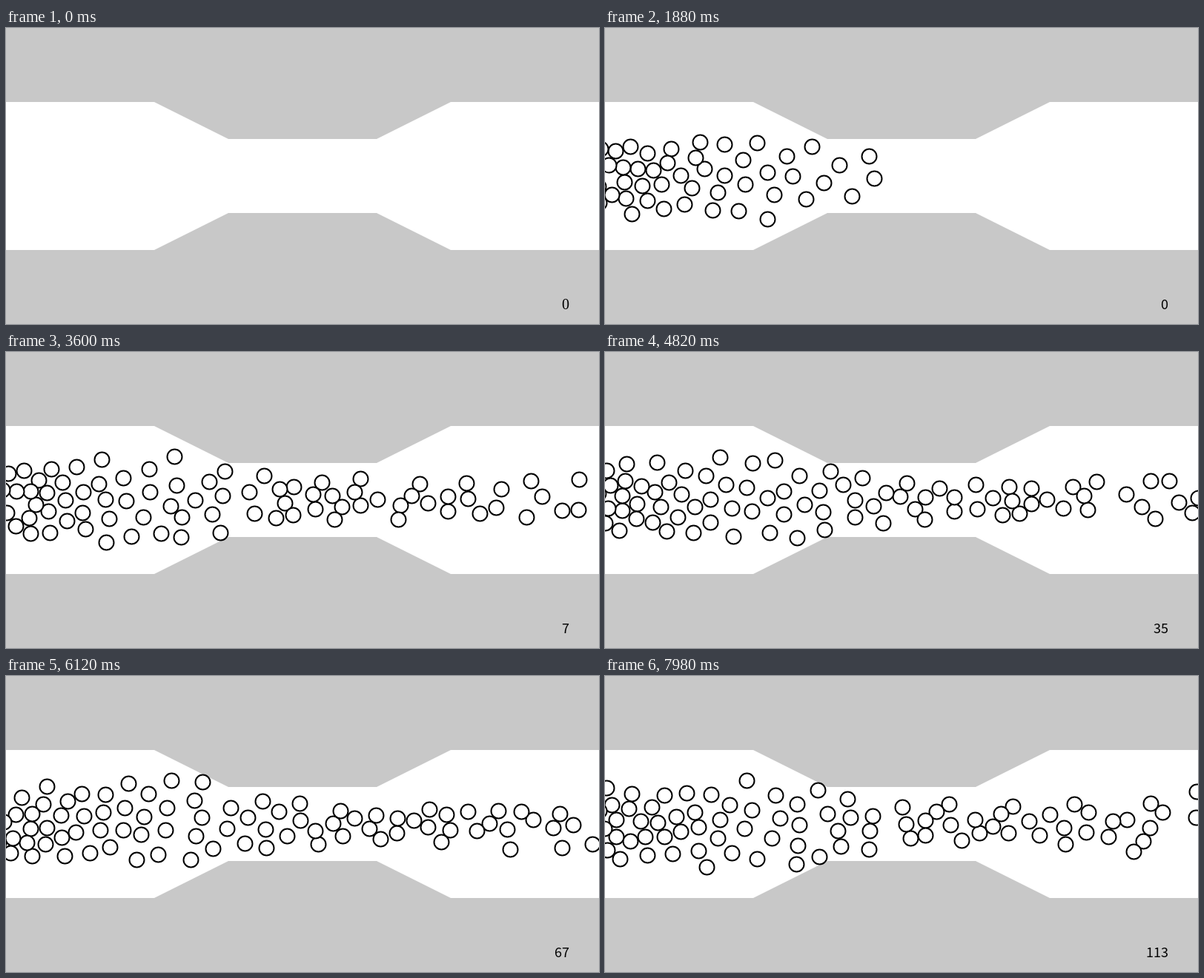
Write an HTML page with a canvas that moves like this. It is 800 px wide and 400 px high and loops after 8 s.

```html
<!DOCTYPE html>
<html lang="en">
<head>
<meta charset="utf-8">
<title>Particles through a narrow passage</title>
<style>
  html, body { margin: 0; width: 100%; height: 100%; overflow: hidden; background: #c8c8c8; }
  svg, canvas { position: absolute; left: 0; top: 0; width: 800px; height: 400px; }
  text { font: 18px "Noto Sans CJK JP", "Noto Sans CJK SC", "Noto Sans CJK", "Noto Sans", sans-serif; text-anchor: end; }
  text.initial { font: 20px "Liberation Serif", serif; }
</style>
</head>
<body>
<svg viewBox="0 0 800 400">
  <path fill="#fff" d="M0 100H200L300 150H500L600 100H800V300H600L500 250H300L200 300H0Z"/>
  <text id="counter" class="initial" x="760" y="380">0</text>
</svg>
<canvas id="stage" width="800" height="400"></canvas>
<script>
const LOOP = 8000, STEP = 20, PREROLL = 8;
const RADIUS = 10, EXIT = 811, MID = 200;
const ctx = document.getElementById('stage').getContext('2d');
const counter = document.getElementById('counter');

let particles, passed, spawned, seed, steps;

function reset() {
  particles = [];
  passed = spawned = steps = 0;
  seed = 20117;
}

function random(low, high) {
  seed = (seed * 16807) % 2147483647;
  return low + (high - low) * seed / 2147483647;
}

const clamp = (v, low, high) => Math.min(high, Math.max(low, v));

// Half the height of the passage at x.
const halfHeight = x => 50 + 50 * clamp((Math.abs(x - 400) - 100) / 100, 0, 1);

// Constant acceleration to the right, as speed over distance.
const flowSpeed = x => Math.sqrt(4.6 + 0.066 * Math.max(x, -10));

function spawn() {
  const lead = 1 + 0.06 * Math.exp(-spawned / 6);
  particles.push({
    x: -30,
    y: MID + random(-28, 28),
    ux: 0,
    vy: random(-0.25, 0.25),
    pace: lead * (spawned ? random(0.96, 1.04) : 1)
  });
  spawned++;
}

function eachPair(range, act) {
  for (let i = 0; i < particles.length; i++) {
    for (let j = i + 1; j < particles.length; j++) {
      const a = particles[i], b = particles[j];
      const dx = b.x - a.x, dy = b.y - a.y;
      if (Math.abs(dx) >= range || Math.abs(dy) >= range) continue;
      const d = Math.sqrt(dx * dx + dy * dy) || 0.01;
      if (d < range) act(a, b, dx / d, dy / d, range - d);
    }
  }
}

function repel(a, b, nx, ny, depth) {
  const f = 0.0006 * depth;
  a.ux -= f * nx; a.vy -= f * ny;
  b.ux += f * nx; b.vy += f * ny;
}

function separate(a, b, nx, ny, depth) {
  const f = 0.4 * depth;
  a.x -= f * nx; a.y -= f * ny;
  b.x += f * nx; b.y += f * ny;
}

function keepInside(p) {
  const limit = halfHeight(p.x) - RADIUS - 1;
  const offset = p.y - MID;
  if (Math.abs(offset) <= limit) return;
  const side = Math.sign(offset);
  p.y = MID + side * limit;
  p.vy = -side * random(0.4, 1.6);
}

// The narrowing bends paths inwards, the widening lets them fan out.
function bend(x) {
  if (x > 500) return 0.0006;
  return x > 180 && x < 300 ? -0.0008 : 0;
}

function advance() {
  if (steps % 2 === 0) spawn();
  eachPair(32, repel);
  for (const p of particles) {
    p.vy += (p.y - MID) * bend(p.x);
    p.ux *= 0.95;
    p.vy *= 0.985;
    p.x += flowSpeed(p.x) * p.pace + p.ux;
    p.y += p.vy;
  }
  for (let i = 0; i < 5; i++) {
    eachPair(RADIUS * 2 - 0.5, separate);
    particles.forEach(keepInside);
  }
  const before = particles.length;
  particles = particles.filter(p => p.x < EXIT);
  passed += before - particles.length;
  steps++;
}

function draw(tick) {
  ctx.clearRect(0, 0, 800, 400);
  ctx.fillStyle = '#fff';
  ctx.strokeStyle = '#000';
  ctx.lineWidth = 2;
  for (const p of particles) {
    ctx.beginPath();
    ctx.arc(Math.floor(p.x) + 0.5, Math.floor(p.y) + 0.5, RADIUS, 0, Math.PI * 2);
    ctx.fill();
    ctx.stroke();
  }
  counter.textContent = passed;
  counter.setAttribute('class', tick ? '' : 'initial');
}

const start = performance.now();
let shown = -1;

function frame() {
  const elapsed = Math.max(0, performance.now() - start);
  const tick = Math.floor((elapsed % LOOP) / STEP);
  if (tick !== shown) {
    if (tick + PREROLL < steps) reset();
    while (steps < tick + PREROLL) advance();
    draw(tick);
    shown = tick;
  }
  requestAnimationFrame(frame);
}

reset();
frame();
</script>
</body>
</html>
```
